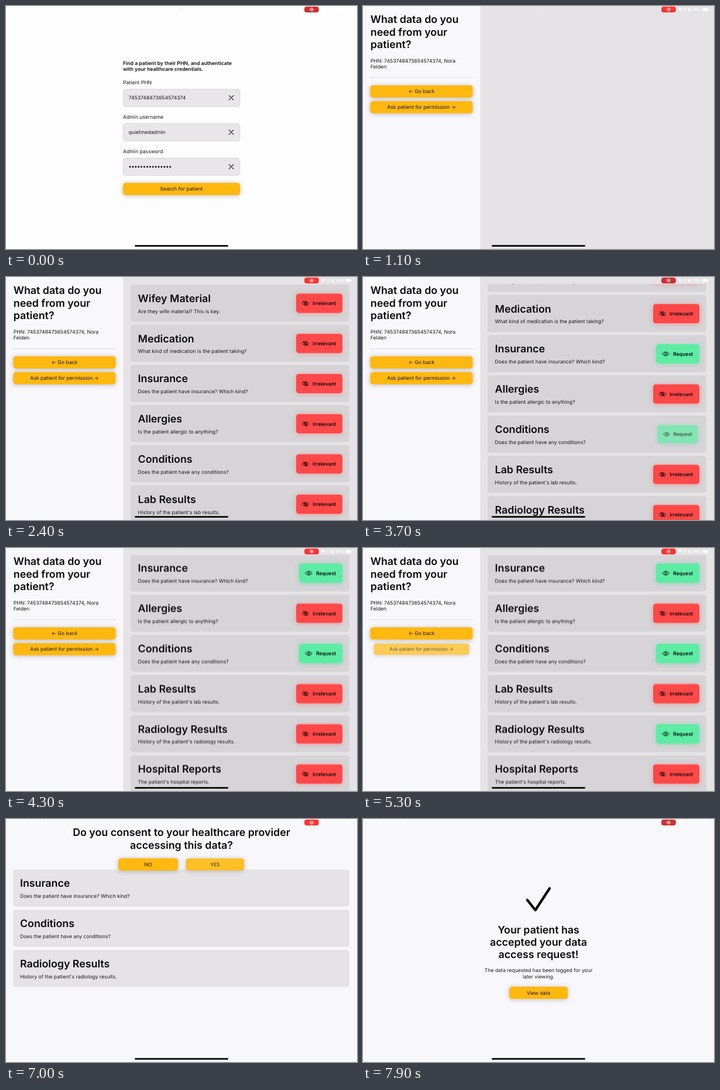
Animation of 600x416 px, one loop 8000 ms. Source, as an HTML page:

```html
<!DOCTYPE html>
<html lang="en">
<head>
<meta charset="utf-8">
<title>Patient data request</title>
<style>
html, body { margin: 0; width: 100%; height: 100%; overflow: hidden; background: #f8f7fb; }
svg { display: block; width: 100%; height: 100%; }
text {
  font: 400 8.63px Inter, Roboto, sans-serif;
  font-optical-sizing: none;
  text-rendering: geometricPrecision;
  fill: #161617;
}
.title { font-size: 17.8px; font-weight: 600; fill: #0a0a0b; }
.bold { font-weight: 600; fill: #0a0a0b; }
.mid { text-anchor: middle; }
.status text { font-size: 6px; font-weight: 500; fill: #fff; }
.gold { fill: #ffb80f; filter: drop-shadow(0 1.5px 4.5px rgba(0, 0, 0, .24)); }
.red { fill: #ff4848; filter: drop-shadow(0 1px 4px rgba(255, 72, 72, .4)); }
.green { fill: #5deca4; filter: drop-shadow(0 1px 4px rgba(60, 210, 140, .45)); }
.field { fill: #e8e6e9; stroke: #cfcdd0; stroke-width: .8; }
.line { fill: none; stroke: #0a0a0b; stroke-linecap: round; stroke-linejoin: round; }

/* Every part runs on the same 8 s loop; --t shifts a shared keyframe set to its start. */
.page, .hold, .grow, .scroll { animation: 8s cubic-bezier(.33, 1, .68, 1) infinite; }
.scroll { animation-name: scroll; animation-timing-function: ease-in-out; }
.grow { animation-name: grow; }
#find { animation-name: find; }
#choose { animation-name: choose; }
#consent { animation-name: consent; }
#done { animation-name: done; }
#choose .hold { animation-name: hold-topics; }
#consent .hold { animation-name: hold-consent; }
.appear, .press, .on, .off {
  animation: 8s infinite;
  animation-delay: calc(var(--t) * 1ms - 8s);
}
.appear { animation-name: appear; }
.press { animation-name: press; }
.on { animation-name: on; animation-timing-function: step-end; }
.off { animation-name: off; animation-timing-function: step-end; }
.rec { animation: pulse 2s infinite linear; }

@keyframes find {
  0%, 3.125% { transform: none; }
  10.15%, 100% { transform: translateX(-200px); }
}
@keyframes choose {
  0%, 3.125% { transform: translateX(600px); }
  10.15%, 68.125% { transform: translateX(0); }
  75.15%, 100% { transform: translateX(-200px); }
}
@keyframes consent {
  0%, 68.125% { transform: translateX(600px); }
  75.15%, 91.25% { transform: translateX(0); }
  98.28%, 100% { transform: translateX(-200px); }
}
@keyframes done {
  0%, 91.25% { transform: translateX(600px); }
  98.28%, 100% { transform: translateX(0); }
}
/* Cards keep their place on screen while their page slides away. */
@keyframes hold-topics {
  0%, 68.125% { transform: translateX(0); }
  75.15%, 100% { transform: translateX(200px); }
}
@keyframes hold-consent {
  0%, 91.25% { transform: translateX(0); }
  98.28%, 100% { transform: translateX(200px); }
}
@keyframes grow {
  0%, 68.125% { width: 0; }
  75.15%, 100% { width: 575px; }
}
@keyframes scroll {
  0%, 30.625% { transform: translateY(0); }
  33.75%, 46.875% { transform: translateY(-51px); }
  52.5%, 100% { transform: translateY(-139.5px); }
}
@keyframes appear {
  0% { opacity: 0; }
  2.5%, 82% { opacity: 1; }
  82.1%, 100% { opacity: 0; }
}
@keyframes press {
  0%, 4.5%, 100% { transform: scale(1); opacity: 1; }
  1.25%, 2.5% { transform: scale(.93); opacity: .7; }
}
@keyframes on { 0%, 35%, 100% { opacity: 0; } 2% { opacity: 1; } }
@keyframes off { 0%, 35%, 100% { opacity: 1; } 2% { opacity: 0; } }
@keyframes pulse {
  0%, 84%, 100% { fill: #cd3032; }
  16%, 62% { fill: #fc3532; }
}
</style>
</head>
<body>
<svg id="stage" viewBox="0 0 600 416" xmlns="http://www.w3.org/2000/svg"></svg>
<script>
const PHN = '7453748473654574374';
const STEP = 68.8;   // distance between card tops
const TOPICS = [
  ['Wifey Material', 'Are they wife material? This is key.'],
  ['Medication', 'What kind of medication is the patient taking?'],
  ['Insurance', 'Does the patient have insurance? Which kind?', 2880],
  ['Allergies', 'Is the patient allergic to anything?'],
  ['Conditions', 'Does the patient have any conditions?', 3520],
  ['Lab Results', "History of the patient's lab results."],
  ['Radiology Results', "History of the patient's radiology results.", 4740],
  ['Hospital Reports', "The patient's hospital reports."]
];

const rect = (x, y, w, h, attrs, r = 0) =>
  `<rect x="${x}" y="${y}" width="${w}" height="${h}" rx="${r}" ${attrs}/>`;
const text = (x, y, s, cls = '') => `<text x="${x}" y="${y}" class="${cls}">${s}</text>`;
const lines = (x, y, gap, rows, cls) =>
  rows.map((s, i) => text(x, y + i * gap, s, cls)).join('');
const page = (id, bg, body) =>
  `<g class="page" id="${id}">${rect(0, 0, 600, 416, `fill="${bg}"`)}${body}</g>`;
const pressable = (x, y, t, body) => t
  ? `<g class="press" style="--t:${t};transform-origin:${x}px ${y}px">${body}</g>`
  : body;

function button(x, y, w, label, t) {
  const cx = x + w / 2;
  return pressable(cx, y + 10.5, t,
    rect(x, y, w, 21, 'class="gold"', 4.5) + text(cx, y + 13.5, label, 'mid'));
}

function field(y, label, content) {
  return text(200, y - 7.7, label) + rect(200.4, y + .4, 199.4, 29.6, 'class="field"', 4.5) + content +
    `<path class="line" d="M381.3 ${y + 11.4}l7.4 7.4m0 -7.4l-7.4 7.4" stroke-width="1.1"/>`;
}

const eye = (x, y, slash) => `<g class="line" transform="translate(${x} ${y})">
  <path d="M-5.7 0Q0 -7 5.7 0Q0 7 -5.7 0Z${slash ? 'M-4 -3.8L4 3.8' : ''}"/><circle r="1.8"/></g>`;

const irrelevant = y => rect(496, y, 79, 33, 'class="red"', 4.5) +
  eye(512, y + 16.6, true) + text(524.3, y + 19.7, 'Irrelevant', 'bold');
const request = y => rect(501, y, 74, 33, 'class="green"', 4.5) +
  eye(517.6, y + 16.6) + text(530, y + 19.7, 'Request', 'bold');

const cardText = (x, y, [name, info]) =>
  text(x, y + 29.8, name, 'title') + text(x, y + 48.5, info);

function topicCard(topic, i) {
  const y = 13 + i * STEP, by = y + 15.4, t = topic[2];
  const toggle = t
    ? pressable(537.5, by + 16.5, t,
        `<g class="off" style="--t:${t}">${irrelevant(by)}</g><g class="on" style="--t:${t}">${request(by)}</g>`)
    : irrelevant(by);
  return `<g class="appear" style="--t:${1150 + i * 140}">` +
    rect(213, y, 374, 63.4, 'fill="#d6d4d7"', 4.5) + cardText(225.6, y, topic) + toggle + '</g>';
}

function consentCard(topic, i) {
  const y = 86.5 + i * STEP;
  return rect(12, y, 575, 63.4, 'class="grow" fill="#e5e3e6"', 4.5) + cardText(24, y, topic);
}

const find = page('find', '#fefdfe',
  lines(200, 100.7, 10.5, ['Find a patient by their PHN, and authenticate',
    'with your healthcare credentials.'], 'bold') +
  field(142, 'Patient PHN', text(209.6, 160, PHN)) +
  field(201, 'Admin username', text(209.6, 219, 'quietmedadmin')) +
  field(260, 'Admin password',
    '<path class="line" d="M212 275.2H281" stroke-width="3" stroke-dasharray="0 4.9"/>') +
  button(200, 302.7, 200, 'Search for patient', 90));

const choose = page('choose', '#f8f7fb',
  rect(200.3, 0, 400, 416, 'fill="#e5e3e6"') +
  lines(12.8, 29.4, 21.2, ['What data do you', 'need from your', 'patient?'], 'title') +
  lines(12.8, 96.8, 10.5, [`PHN: ${PHN}, Nora`, 'Felden']) +
  rect(12.5, 122.6, 175, .8, 'fill="#d3d2d6"') +
  button(12.4, 135.7, 175.1, '← Go back') +
  button(12.4, 162.8, 175.1, 'Ask patient for permission →', 5180) +
  `<clipPath id="panel">${rect(200, 12, 400, 404, '')}</clipPath>
  <g clip-path="url(#panel)"><g class="hold"><g class="scroll">${TOPICS.map(topicCard).join('')}</g></g></g>`);

const consent = page('consent', '#f8f7fb',
  lines(300, 29.4, 21.2, ['Do you consent to your healthcare provider',
    'accessing this data?'], 'title mid') +
  `<g class="hold">${TOPICS.filter(topic => topic[2]).map(consentCard).join('')}</g>` +
  button(192, 67.2, 102, 'NO') +
  button(306.3, 67.2, 102, 'YES', 6980));

const done = page('done', '#f8f7fb',
  '<path class="line" d="M280.8 138.6L294.6 156L319 118.8" stroke-width="4.3"/>' +
  lines(300, 196, 20.9, ['Your patient has', 'accepted your data', 'access request!'], 'title mid') +
  lines(300, 262, 10.5, ['The data requested has been logged for your', 'later viewing.'], 'mid') +
  button(250, 287, 100, 'View data'));

const status = `<g class="status" fill="#fff">
  ${text(8.5, 8, '4:28 PM')}${text(37, 8, 'Sat Apr 8')}${text(564, 8, '98%')}
  <path d="M66 6.4L70 4L68.3 8.4L67.8 6.8Z"/>
  <path d="M538.8 4.6Q542 2 545.2 4.6L542 8.6Z"/>
  <circle cx="550.5" cy="6" r="2" fill="none" stroke="#fff" stroke-width=".8"/>
  <path d="M558.6 3.3A2.7 2.7 0 1 0 561 7.4A2.9 2.9 0 0 1 558.6 3.3Z"/>
  ${rect(580, 3.4, 9.5, 5, '', 1.5)}${rect(590, 5, .9, 2, '')}
  <path d="M296 6h8.1" fill="none" stroke="#efeef1" stroke-width="2" stroke-linecap="round" stroke-dasharray="0 4"/>
  ${rect(510, 1.1, 24.8, 9.8, 'class="rec"', 4)}
  <circle cx="522.4" cy="6" r="2.8" fill="none" stroke="#fff" stroke-width=".8"/>
  <circle cx="522.4" cy="6" r="1.3"/>
</g>`;

document.getElementById('stage').innerHTML = find + choose + consent + done + status +
  rect(220, 409.2, 160, 2.7, 'fill="#050505"', 1.35);
</script>
</body>
</html>
```
